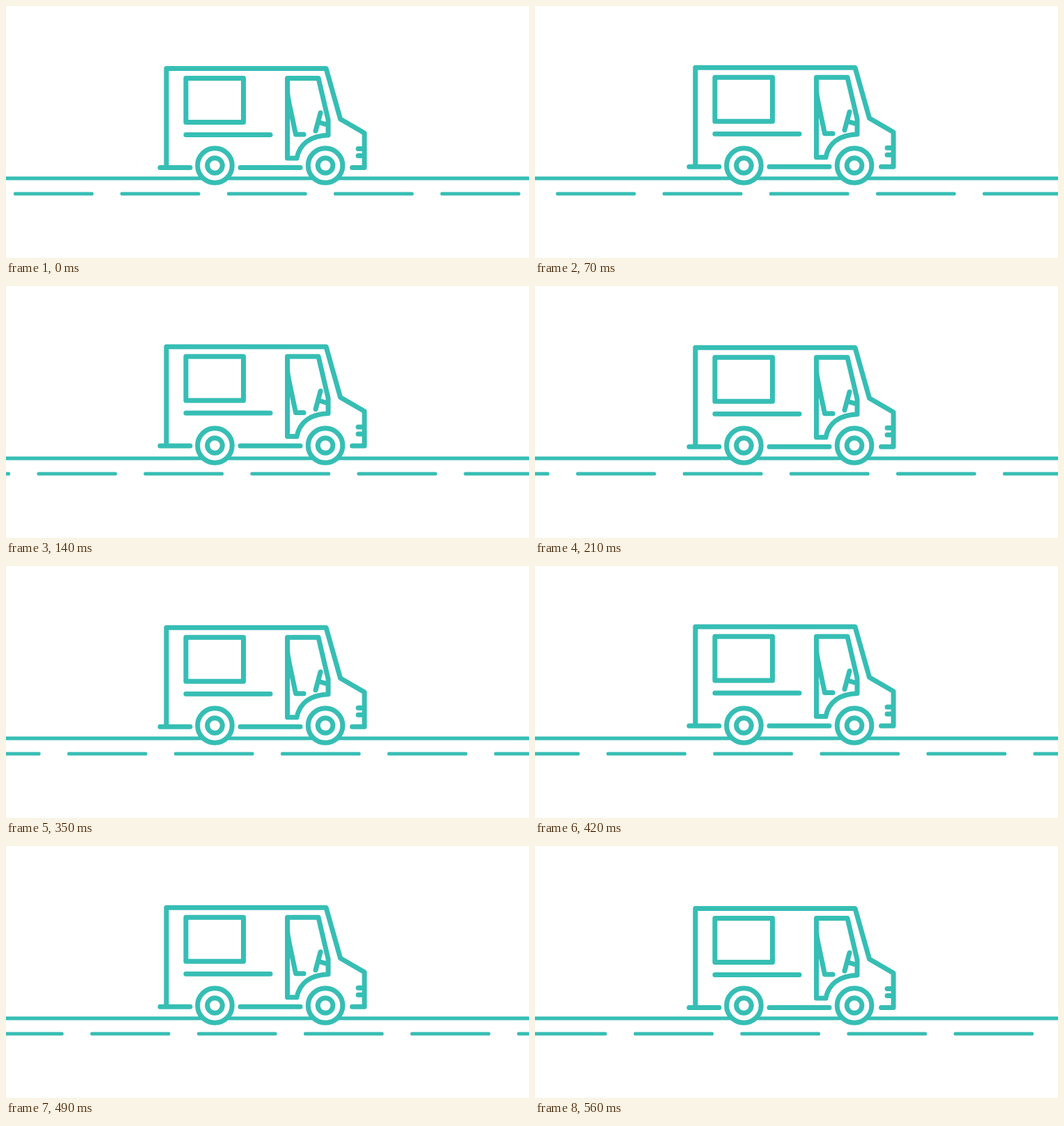
An HTML page with a canvas that plays this animation: 750 px wide and 361 px high, repeating every 630 ms.

```html
<!DOCTYPE html>
<html lang="en">
<head>
<meta charset="utf-8">
<title>Van on the road</title>
<style>
html, body { margin: 0; width: 100%; height: 100%; overflow: hidden; background: #fff; }
canvas { display: block; width: 100vw; height: 100vh; }
</style>
</head>
<body>
<canvas id="stage" width="750" height="361"></canvas>
<script>
const ctx = document.getElementById('stage').getContext('2d');
const TEAL = '#36beb4';
const STEP = 70;
const GAP = 153;
// Road travel per step: slower in the middle of the loop.
const TRAVEL = [0, 19, 33.5, 48, 63, 77, 91.5, 110, 130.5];

const van = new Path2D([
  'M221 231.5H264M230 231.5V89.5H459L479.5 162L514 182V231.5H496.5',
  'M336 231.5H422M505 204.5H514M505 214.5H514',
  'M258 103.5H340.5V166.5H258Z',
  'M258 184.5H379',
  'M403.5 103.5H448L462 163V185C437 186 421 197 417 218H403.5Z',
  'M403.5 122Q404 130 406 139L415.5 184H427',
  'M451 153L444 179M448.5 166.5L460 170'
].join(''));

function drawRoad(travel) {
  ctx.fillStyle = TEAL;
  ctx.fillRect(0, 244.3, 750, 5.2);
  for (let x = 11 + travel - GAP; x < 750; x += GAP) {
    ctx.beginPath();
    ctx.roundRect(x, 266.4, 114.5, 5.2, 1.8);
    ctx.fill();
  }
}

function ring(x, y, r) {
  ctx.beginPath();
  ctx.arc(x, y, r, 0, Math.PI * 2);
  ctx.fill();
  ctx.stroke();
}

function drawWheel(x) {
  ctx.fillStyle = '#fff';
  ring(x, 228.5, 24.8);
  ring(x, 228.5, 10.8);
}

function draw(now) {
  const step = Math.floor(now / STEP) % TRAVEL.length;
  const lift = 1.25 * (1 - Math.cos(step * Math.PI / 2));

  ctx.fillStyle = '#fff';
  ctx.fillRect(0, 0, 750, 361);
  drawRoad(TRAVEL[step]);

  ctx.strokeStyle = TEAL;
  ctx.lineWidth = 7;
  ctx.lineCap = ctx.lineJoin = 'round';
  ctx.save();
  ctx.translate(0, -lift);
  ctx.stroke(van);
  ctx.restore();

  drawWheel(299.5);
  drawWheel(458);
}

const start = performance.now();
function tick() {
  draw(performance.now() - start);
  requestAnimationFrame(tick);
}
tick();
</script>
</body>
</html>
```
